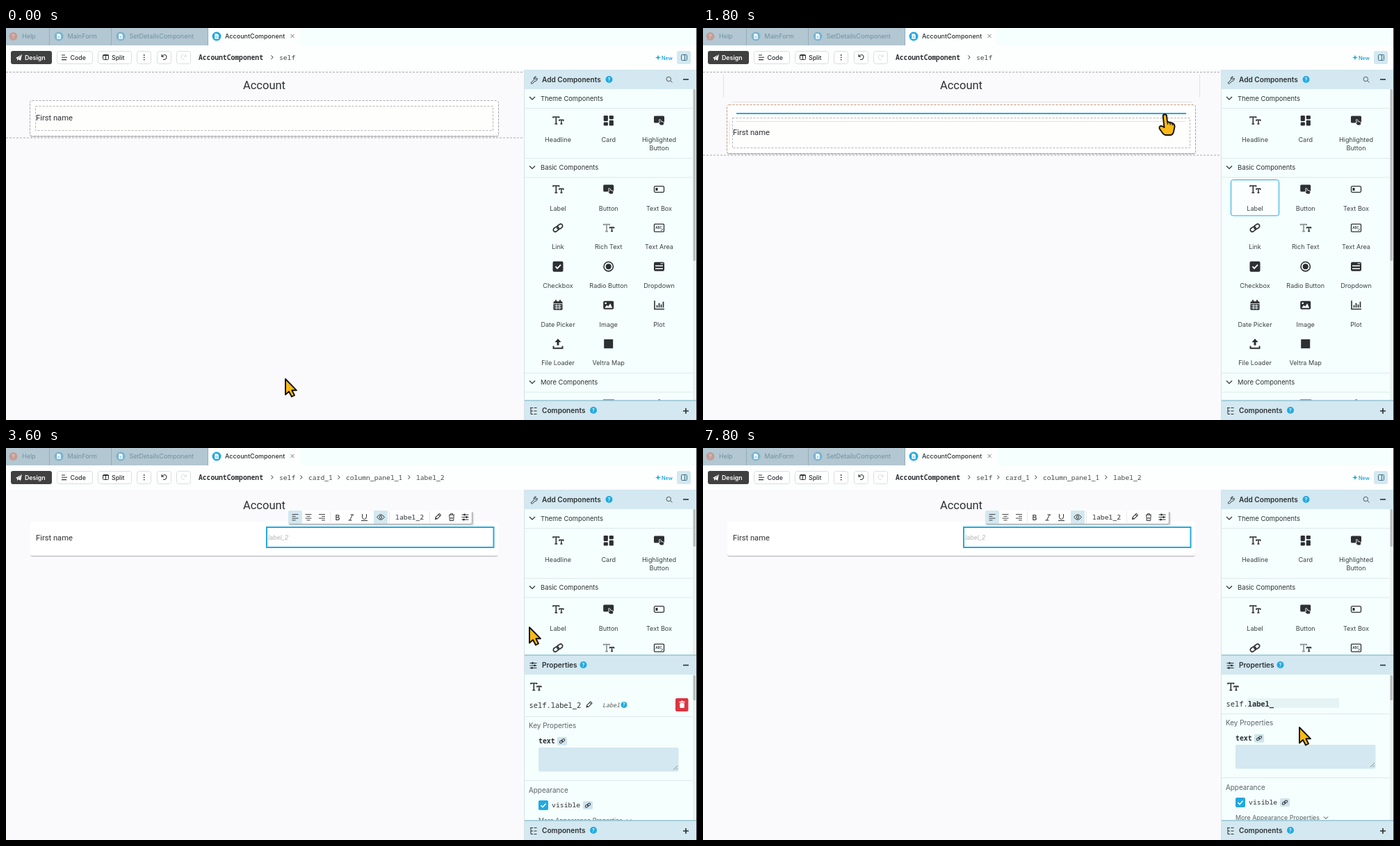
Write an HTML page that moves like this. It is 994x564 px and loops after 8 s.

```html
<!DOCTYPE html>
<html lang="en">
<head>
<meta charset="utf-8">
<title>Form designer</title>
<style>
  html, body { margin: 0; width: 100%; height: 100%; overflow: hidden; }
  svg { display: block; width: 100%; height: 100%; font-family: Inter, sans-serif; }
  text { white-space: pre; }
  .mono { font-family: "Noto Sans Mono", monospace; }
  .app { font-family: Roboto, sans-serif; }
  .bold { font-weight: 600; }
  .medium { font-weight: 500; }
  .italic { font-style: italic; }
  .mid { text-anchor: middle; }
</style>
</head>
<body>
<svg id="stage" viewBox="0 0 994 564"></svg>
<script>
const LOOP = 8000, STEP = 200;
const INK = '#2d3033', BLUE = '#22a9e0', MINT = '#f5fffd', BAR = '#d3e8f0', RULE = '#dcebea';
const DRAG = 1000, OVER = 1600, SIDE = 2200, DROP = 3000, EDIT = 5000, ERASE = 7200;

// Drawing helpers
const rect = (x, y, w, h, fill, r = 0, stroke = 'none', more = '') =>
  `<rect x="${x}" y="${y}" width="${w}" height="${h}" rx="${r}" fill="${fill}" stroke="${stroke}" ${more}/>`;
const line = (d, color = INK, width = 1, more = '') =>
  `<path d="${d}" fill="none" stroke="${color}" stroke-width="${width}" ${more}/>`;
const shape = (d, fill = INK) => `<path d="${d}" fill="${fill}"/>`;
const dot = (x, y, r, fill = INK, stroke = 'none', w = 1) =>
  `<circle cx="${x}" cy="${y}" r="${r}" fill="${fill}" stroke="${stroke}" stroke-width="${w}"/>`;
const text = (x, y, s, size, cls = '', fill = INK) =>
  `<text x="${x}" y="${y}" font-size="${size}" class="${cls}" fill="${fill}">${s}</text>`;
const at = (x, y, body, more = '') => `<g transform="translate(${x} ${y}) ${more}">${body}</g>`;
const dashed = (x, y, x2, y2, color, r = 0, fill = 'none') =>
  rect(x, y, x2 - x, y2 - y, fill, r, color, 'stroke-dasharray="3 2"');
const help = (x, y, r = 5) => dot(x, y, r, BLUE) + text(x, y + 2.5, '?', 7, 'mid bold', '#fff');
const chevron = (x, y) => line(`M${x - 4} ${y - 2}l4 4 4-4`, INK, 1.2);

const bigT = c => line('M-7-3.5V-5H1.5v1.5M-2.7-5V4.7M-4.6 5H-.8', c, 1.6);
const smallT = line('M2 1V-.8H7.7V1M4.9-.8V4.7M3.4 5h3', INK, 1.5);
const pressed = rect(-7.5, -6.5, 15, 10, INK, 1.5) +
  `<path d="M0-1q1.5-1.5 2.3.4l.6 2 3.3.8q1.2.6.8 2.2L6.3 7H2L-1 3.8q0-1.2 1.8-.6z" fill="${INK}" stroke="#fff" stroke-width=".9"/>`;
const icons = {
  label: bigT(INK) + smallT,
  rich: bigT('#8b9193') + smallT,
  card: rect(-7, -7, 6.2, 8, INK, 1.2) + rect(1, -7, 6.2, 5.2, INK, 1.2) +
    rect(-7, 2.5, 6.2, 5, INK, 1.2) + rect(1, -.3, 6.2, 7.8, INK, 1.2),
  button: pressed,
  textbox: rect(-7, -4.3, 14, 8.6, 'none', 1.5, INK, 'stroke-width="1.3"') + rect(-5, -2, 3, 4, INK),
  link: `<g transform="rotate(-35)">${rect(-7.5, -2.8, 8.5, 5.6, 'none', 2.8, INK, 'stroke-width="1.7"') +
    rect(-1, -2.8, 8.5, 5.6, 'none', 2.8, INK, 'stroke-width="1.7"')}</g>`,
  textarea: rect(-7, -5.5, 14, 11, 'none', 1, INK, 'stroke-width="1.3"') +
    text(-5.3, 1, 'ABC', 4.5, 'bold') + line('M3 4l2.5-2.5'),
  check: rect(-7.5, -7.5, 15, 15, INK, 2) + line('M-3.5 0l2.5 2.7 5-5.3', '#fff', 1.7),
  radio: dot(0, 0, 6.7, 'none', INK, 1.6) + dot(0, 0, 4),
  dropdown: rect(-7.5, -6.5, 15, 13, INK, 2) + line('M-5.5-1h11M-5.5 3h11', '#fff', 1.5) + line('M2-4.3h4', '#fff'),
  date: rect(-6.5, -5.5, 13, 12.5, INK, 1.5) + line('M-3-7.5v3M3-7.5v3', INK, 2) +
    line('M-6.5-2h13M-5 1H5M-5 4H5M-2-1v7M2-1v7', MINT),
  image: rect(-7.5, -6, 15, 12, INK, 2) + shape('M-5.5 4l3-4 2 2 3-4.5L5.5 4z', MINT) + dot(-4, -2.8, 1.3, MINT),
  plot: line('M-6.5-6.5V5.7H7.5', INK, 1.6) + line('M-3 0v3.5M0-3v6.5M3-1v4.5M6-5v8.5', INK, 1.7),
  upload: shape('M0-7.5l4.5 5h-3V2h-3v-4.5h-3z') + line('M-6.5 3v3.3h13V3', INK, 1.9),
  square: rect(-6.5, -6.5, 13, 13, INK),
  pencil: `<g transform="rotate(45)">${rect(-1.6, -5, 3.2, 8, 'none', .5, INK) + line('M-1.6-3h3.2') + shape('M-1.6 3h3.2L0 6z')}</g>`,
  sliders: line('M-5-3.5H5M-5 0H5M-5 3.5H5') + dot(-1, -3.5, 1.4) + dot(2, 0, 1.4) + dot(-2, 3.5, 1.4),
  trash: line('M-4-3.3h8M-1.5-3.5v-1.3h3v1.3M-3.2-3l.5 8h5.4l.5-8M-1 0v3M1 0v3'),
  file: shape('M-2.7-3.8H1L2.8-2V3.8H-2.7z', '#fff') + line('M-1.3 0h2.7M-1.3 1.8h2.7', BLUE, .7)
};
const icon = (name, x, y, more) => at(x, y, icons[name], more);

// Header: tabs, toolbar, breadcrumb
function tab(x, w, label, mark) {
  return rect(x, 0, w, 25, '#b2c7d1') + line(`M${x + w - .5} 0v25`, '#93adba') + mark +
    text(x ? x + 25.5 : 23, 15, label, 9, '', '#7390a0');
}
function header(t) {
  const doc = (x, fill) => dot(x, 12, 6.5, fill) + icon('file', x, 12);
  const box = (x, w) => rect(x + .5, 33.5, w, 18, '#fff', 3, '#d9dedf');
  const crumbs = t < DROP ? [[393, 'self']] :
    [[393, 'self'], [435, 'card_1'], [489, 'column_panel_1'], [590, 'label_2']];
  return rect(0, 0, 994, 60, '#fdfffe') + rect(423, 0, 571, 25, MINT) +
    tab(0, 63, 'Help', dot(10.5, 12, 6, '#c59c95') + text(10.5, 15, '?', 8, 'mid bold', '#e3d1cf')) +
    tab(63, 89, 'MainForm', doc(76, '#79b4d1')) + tab(152, 139, 'SetDetailsComponent', doc(165, '#79b4d1')) +
    rect(291, 0, 132, 25, '#fdfffe') + doc(303, BLUE) + text(315, 15, 'AccountComponent', 9, 'medium') +
    line('M409.5 9l5 5m0-5l-5 5', '#777') +
    rect(7, 33, 59, 19, '#404040', 3) + shape('M14 43l9-5-2 9-3-2-2 2v-3z', '#fff') + line('M17 44l5-5', '#404040', .7) +
    text(27, 45.5, 'Design', 8.8, 'bold', '#fff') +
    box(73, 51) + line('M80 39h5M80 42.3h8M80 45.6h7', INK, 1.1) + text(92.5, 45.5, 'Code', 8.8, 'medium') +
    box(132, 48) + rect(139.5, 38.5, 8, 7, 'none', 1, INK) + line('M143.5 38v8M139 39.5h9') +
    text(152, 45.5, 'Split', 8.8, 'medium') +
    box(188, 20) + [39, 42.3, 45.6].map(y => dot(198.7, y, .9)).join('') +
    box(217, 20) + line('M224 38v3.2h3.2M224 41q5-5 7 0 0 5-5 4.5', INK, 1.1) +
    box(245, 20) + line('M259 38v3.2h-3.2M259 41q-5-5-7 0 0 5 5 4.5', '#dde1e2', 1.1) +
    text(277, 45.5, 'AccountComponent', 9.7, 'mono bold') +
    crumbs.map(([x, s]) => line(`M${x - 11.5} 39.5l2.5 2.7-2.5 2.7`) + text(x, 45.5, s, 9.7, 'mono', '#444')).join('') +
    shape('M938 38.5l1 3 3 1-3 1-1 3-1-3-3-1 3-1z', BLUE) + text(943, 45.5, 'New', 7.3, 'bold', BLUE) +
    rect(965, 33, 20, 19, BAR, 3) + rect(971.5, 38.5, 8, 8, 'none', 1, '#3c6b80') + line('M976.5 38v9', '#3c6b80');
}

// Design surface
function surface(t) {
  const grey = '#a9a9ab', title = text(371.5, 88, 'Account', 16.5, 'app mid');
  const shadow = (x, y, w, h) => rect(x, y + 1.5, w, h, '#0002', 3) + rect(x, y + .7, w, h, '#0003', 3);
  const bg = rect(0, 60, 745, 504, '#fafafc') + title;
  if (t >= DROP) return bg + shadow(35, 106, 673, 49) + rect(35, 106, 673, 49, '#fff', 2) +
    text(43, 133, 'First name', 11.2, 'app') +
    rect(375, 114, 326.5, 29, '#fff', 0, BLUE, 'stroke-width="2"') + text(377, 131.5, 'label_2', 9.6, 'app italic', '#b5b5b8') +
    formatBar();
  const over = t >= OVER;
  const [top, bottom, right, inTop, inBottom, inRight, end] =
    !over ? [104.5, 155.5, 708.5, 112.5, 147.5, 700.5, 158] :
    t < SIDE ? [110.5, 180.5, 708.5, 129.5, 172.5, 700.5, 183] : [104.5, 174.5, 703.5, 116.5, 162.5, 684.5, 177.5];
  const edge = over ? '#c49a78' : grey;
  let out = bg + line(`M0 63.5H745M0 ${end}H745`, grey, 1, 'stroke-dasharray="3 2"') +
    shadow(34.5, top, right - 34.5, bottom - top) + dashed(34.5, top, right, bottom, edge, 3, '#fff') +
    dashed(42.5, inTop, inRight, inBottom, '#b5b5b5', 0, '#fefefd') +
    text(43, (inTop + inBottom) / 2 + 3, 'First name', 11.2, 'app');
  if (!over) return out;
  const faint = '#e1e1e3';
  out += line(`M29.5 67v33M714.5 67v33M38 ${inTop + 5}V${inBottom - 5}`, faint);
  return out + (t < SIDE
    ? line('M42 106.5H703M48 134.5H694', faint) + line('M48 123H695', BLUE, 2)
    : line('M48 112.5H684M48 120.5H680M48 158.5H680M711.5 108v62', faint) + line('M695.5 117v43', BLUE, 1.6));
}
function formatBar() {
  const rows = (x, shift) => line([0, 1, 2, 3].map(i => {
    const w = i % 2 ? 5 : 9;
    return `M${x - 4.5 + (9 - w) * shift} ${95.5 + i * 2.8}h${w}`;
  }).join(''), '#444');
  return rect(407, 92, 266, 20, '#0002', 3) + rect(406, 91, 265, 19, '#0004', 3) + rect(406, 90, 264, 19, '#fff', 2) +
    rect(406, 90, 20, 19, BAR, 2) + rect(529, 90, 20, 19, BAR) +
    rows(416, 0) + rows(435, .5) + rows(454.5, 1) +
    line('M466.5 91v17M551.5 91v17M609.5 91v17', '#e4e8e9') +
    text(477, 103.5, 'B', 10.5, 'mid medium') +
    line('M495.5 96h5M492.5 104h5M498.5 96l-4 8') + line('M512.5 95v4q0 3.5 3 3.5t3-3.5v-4M511 104.5h9') +
    line('M533.5 99.5q5.5-7.5 11 0-5.5 7.5-11 0z') + dot(539, 99.5, 1.8, 'none', INK) +
    text(560, 102.8, 'label_2', 9.8, 'mono medium') +
    icon('pencil', 621, 99) + icon('trash', 641, 99.5) + icon('sliders', 660.5, 99.5);
}

// Side panel
const rule = y => line(`M745 ${y + .5}H988`, RULE);
const thumb = (y, h) => rect(988.5, y, 3.5, h, '#b9bebe', 1.5);
const minus = y => line(`M974 ${y}h8`, INK, 1.6);
function section(y, label) {
  return chevron(757, y) + text(769, y + 3.5, label, 9.4) + rule(y + 14);
}
function bar(y, label, helpX, mark, topped = true) {
  return rect(745, y, 248, 28, BAR) + (topped ? line(`M745 ${y}H993`, '#94c3d3', 1.5) : '') +
    mark + text(771, y + 18, label, 10.1, 'bold') + help(helpX, y + 14);
}
const columns = [794, 866.7, 939.5];
const tools = [
  ['label', 'Label'], ['button', 'Button'], ['textbox', 'Text Box'],
  ['link', 'Link'], ['rich', 'Rich Text'], ['textarea', 'Text Area'],
  ['check', 'Checkbox'], ['radio', 'Radio Button'], ['dropdown', 'Dropdown'],
  ['date', 'Date Picker'], ['image', 'Image'], ['plot', 'Plot'],
  ['upload', 'File Loader'], ['square', 'Veltra Map']
];
const tool = (col, y, name, label) =>
  icon(name, columns[col], y) + text(columns[col], y + 30.7, label, 9.1, 'mid', '#3c4144');

function addPanel(t) {
  return rect(745, 60, 249, 504, MINT) + rect(988, 88, 5, 448, '#eaf1f0') + thumb(88, t < DROP ? 247 : 54) +
    bar(60, 'Add Components', 867.5, line('M755 79l4.5-4.5q-1-3 1.5-4.5l1.5.3-2 2 1.5 1.7 2-2q1 4-3 4.5L756.5 80.5z'), false) +
    dot(953.3, 73.5, 3.2, 'none', '#555') + line('M956 76l2.5 2.5', '#555') + minus(74) +
    section(101, 'Theme Components') +
    tool(0, 133, 'label', 'Headline') + tool(1, 133, 'card', 'Card') + tool(2, 133, 'button', 'Highlighted') +
    text(columns[2], 176, 'Button', 9.1, 'mid', '#3c4144') + rule(187) + section(200.5, 'Basic Components') +
    (t >= DRAG && t < DROP ? rect(759.5, 218.5, 69, 51.5, '#fbffff', 3, BLUE) : '') +
    tools.map(([name, label], i) => tool(i % 3, 232 + Math.floor(i / 3) * 55.6, name, label)).join('') +
    rule(496) + section(509.5, 'More Components') + rect(859, 534, 16, 2, '#999') + rect(938.5, 534, 2.5, 2, '#888');
}
function properties(t) {
  const edit = t >= EDIT, caret = (t - EDIT) % 1100 < 500, name = t < ERASE ? 'label_2' : 'label_';
  const badge = (x, y) => rect(x - 7, y - 6, 14, 12, '#cfe4ed', 2) + icon('link', x, y, 'scale(.55)');
  const title = edit
    ? rect(783, 360, 132, 14, '#e6f3f5') + text(752.5, 372, 'self.<tspan class="bold">' + name + '</tspan>', 10.4, 'mono') +
      (caret ? rect(t < ERASE ? 828 : 821, 362, 1, 12, '#111') : '')
    : text(752.5, 373.5, 'self.label_2', 10.4, 'mono') + icon('pencil', 838.5, 369.5) +
      text(858, 373, 'Label', 8.4, 'mono italic', '#555') + help(889, 369.5, 4.5) +
      rect(963, 360, 18.5, 19, '#dc3540', 2) + rect(969.3, 367, 6.5, 7, '#fff', 1) + line('M968.5 365.5h8M971 364.5h3', '#fff', 1.3);
  const fields = rule(386) + text(752, 403, 'Key Properties', 9.9, '', '#5a6266') +
    text(766, 425.3, 'text', 9.8, 'mono bold') + badge(800, 421.7) +
    rect(766, 431, 201.5, 34.5, BAR, 2) + line('M960 463l6-6M963.5 463l2.5-2.5', '#777', .8) +
    rule(478) + text(752, 495.5, 'Appearance', 9.9, '', '#5a6266') +
    rect(766, 507, 14, 14, BLUE, 2) + line('M769.5 514l2.5 2.7 4.5-5', '#fff', 1.5) +
    text(785, 517, 'visible', 9.8, 'mono') + badge(837, 514) +
    text(766, 538.7, 'More Appearance Properties', 8.9, '', '#5a6266') + line('M893 534.5l3 3 3-3');
  return rect(745, 298, 243, 238, MINT) + rect(988, 298, 5, 238, '#eaf1f0') + thumb(327, 36) +
    bar(298, 'Properties', 830.5, icon('sliders', 758.5, 313)) + minus(312.5) +
    icon('label', 762, 343.5) + title + at(0, edit ? -4 : 0, fields);
}
function panel(t) {
  return addPanel(t) + (t >= DROP ? properties(t) : '') +
    bar(536, 'Components', 845, line('M755 546.5v9h3M755 551h3M754 546.5h4M759.5 546.5h4M759.5 551h4M759.5 555.5h4')) +
    line('M974 551h8M978 547v8', INK, 1.6) + line('M745.5 60V564', '#d5e3e6') +
    (t >= 1200 && t < OVER ? rect(741, 60, 7, 504, '#0000000f') : '') + rect(993, 0, 1, 564, '#333');
}

// Pointer
const outline = 'fill="#fbb917" stroke="#111" stroke-width="1.9" stroke-linejoin="round"';
const pointers = {
  arrow: `<path d="M0 0V22.5L5 18 9 25.5 13 23.5 9.3 16.3H16Z" ${outline}/>`,
  hand: `<path d="M-3.3 2C-3.5-1.5 1.5-1.8 2 1.5L3 10 9 11.5Q13.8 13 13.5 17L12 24Q11 29 7 29H1Q-2 29-4 26L-8.3 20Q-9.5 15.5-5 16L-1.5 18Z" ${outline}/>` +
    line('M3 10l.6 4M6.7 11l.5 3.5M10.2 12.2l.1 3', '#111', 1.2),
  beam: line('M-8-10.5H-3L0-8 3-10.5H8M-8 11H-3L0 8.5 3 11H8M0-9V10', '#111', 4.5) + line('M0-9V10M-7-10.5h4l3 2.5 3-2.5h4M-7 11h4L0 8.5 3 11h4', '#f5b81c', 1.2)
};
const path = [
  [0, 402, 505, 'arrow'], [1000, 790, 243, 'hand'], [1200, 778, 228, 'arrow'], [1400, 739, 188, 'arrow'],
  [1600, 692, 147, 'hand'], [1800, 665, 125, 'hand'], [2000, 668, 125, 'hand'], [2600, 690, 143, 'hand'],
  [3000, 691, 143, 'arrow'], [4200, 815, 373, 'hand'], [4800, 818, 372, 'hand'], [5000, 824, 369, 'beam'],
  [5600, 838, 369, 'beam'], [6200, 838, 369, 'beam'], [6400, 849, 388, 'arrow'], [6600, 858, 402, 'arrow'], [LOOP, 858, 402, 'arrow']
];
function pointer(t) {
  const i = path.findIndex(key => key[0] > t) - 1;
  const [t0, x0, y0, kind] = path[i], [t1, x1, y1] = path[i + 1];
  const p = (t - t0) / (t1 - t0), k = p * p * (3 - 2 * p);
  return at(x0 + (x1 - x0) * k, y0 + (y1 - y0) * k, pointers[kind]);
}

const stage = document.getElementById('stage');
let shown = -1;
function play() {
  const t = Math.floor(performance.now() % LOOP / STEP) * STEP;
  if (t !== shown) {
    stage.innerHTML = header(t) + surface(t) + panel(t) + pointer(t);
    shown = t;
  }
  requestAnimationFrame(play);
}
play();
</script>
</body>
</html>
```
